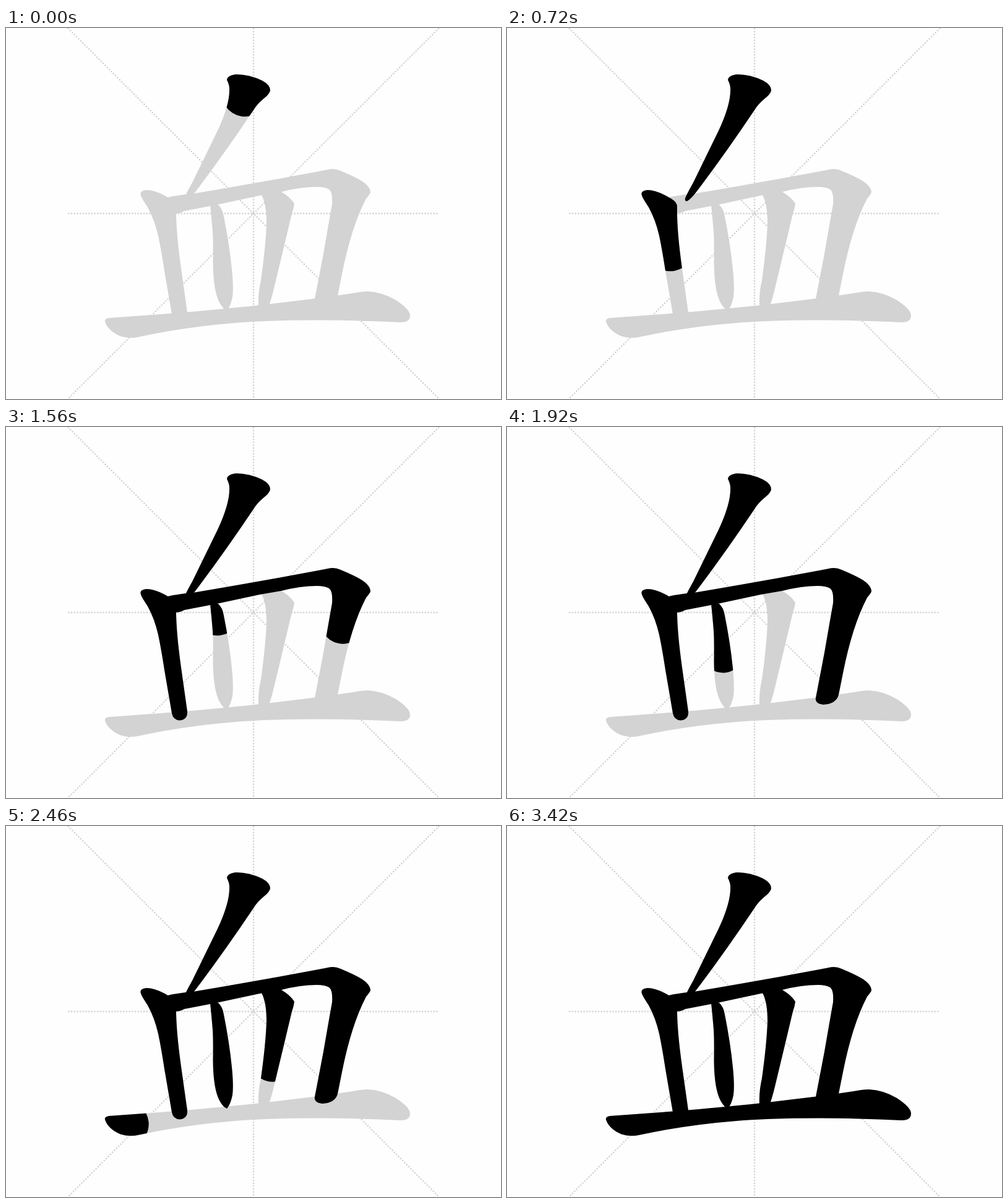
Recreate the animation shown at these times as an HTML page. Size 800x600 px, loop 3480 ms.

```html
<!DOCTYPE html>
<html lang="zh">
<head>
<meta charset="utf-8">
<title>Stroke order</title>
<style>
  html, body { margin: 0; width: 100%; height: 100%; overflow: hidden; background: #fefefe; }
  svg { display: block; width: 800px; height: 600px; }
  .guide { stroke: #d3d3d3; stroke-width: 1; stroke-dasharray: 1 1; fill: none; }
  .base { fill: #d3d3d3; }
  .brush { fill: none; stroke: #000; stroke-width: 75; stroke-linecap: round; stroke-linejoin: round; }
</style>
</head>
<body>
<svg id="stage" viewBox="0 0 800 600">
  <!-- guides on a 256 unit square -->
  <g class="guide" transform="translate(100 0) scale(2.34375)">
    <path d="M0 0L256 256"/>
    <path d="M256 0L0 256"/>
    <path d="M128 0V256"/>
    <path d="M0 128H256"/>
  </g>
</svg>
<script>
const LOOP = 3480, STEP = 60, DRAW = 980;

// start: when the brush touches down; path: brush centre line; shape: outline
const strokes = [
  {
    start: -140,
    path: 'M372 84L391 98L386 106Q366 155 292 278',
    shape: 'M357 84Q358 76 373 75Q393 75 414 85Q427 92 427 101Q426 107 415 115.5Q406 123 400.5 132' +
      'Q353 203 306.5 264.5Q296 278 291 280Q287 281 288 275Q292 266 301 250L342 166Q362 123 361 98Q361 92 357 84Z'
  },
  {
    start: 259,
    path: 'M228 270L252 300L264 356L281 462',
    shape: 'M218 271Q215 263 227 262Q241 262 260 273Q273 279 275 287Q274 325 283 389L293 460' +
      'Q294 473 281 474.5Q270 474 268 463L256 393Q251 360 246 336Q240 310 229 290Q219 275 218 271Z'
  },
  {
    start: 834,
    path: 'M264 287L470 251L530 240L556 262L518 435',
    shape: 'M258 275Q270 271 305 267.5Q415 249 520 229Q531 226 541 231Q565 241 576 248Q589 257 589 266' +
      'Q588 269 582 276Q558 322 543 398L536 433Q532 448 511 449Q497 447 499 438L513 365Q523 307 527 285' +
      'Q528 268 524 263Q520 257 502 257Q476 257 445 265L410 271L340 286L288 296Q282 300 272 300Z'
  },
  {
    start: 1489,
    path: 'M340 288L349 360L356 452',
    shape: 'M330 287Q336 283 343 286Q350 292 352 305Q361 350 365 390Q368 420 366 435Q363 450 357 457' +
      'Q351 455 345 444Q335 425 334.5 380Q335 345 334 330Q332 305 330 287Z'
  },
  {
    start: 1921,
    path: 'M440 285L441 300L431 376L416 450',
    shape: 'M413 270Q428 262 445 265Q460 274 466 284Q465 292 462 300Q449 355 435 413Q428 443 424 451' +
      'Q415 458 408 449Q407 430 412 408Q420 350 421 315Q421 285 413 270Z'
  },
  {
    start: 2435,
    path: 'M182 482H193L434 459L620 456',
    shape: 'M160 475Q159 470 166 469L268 461.5Q355 454.5 425 446.5L500 437.5Q530 433.5 560 429Q575 426 585 426' +
      'Q608 427 630 440Q653 455 653 465Q653 476 638 476Q560 472.5 500 472.5Q420 472.5 365 477.5Q290 483.5 215 499.5' +
      'Q200 503 185 498.5Q165 490 160 475Z'
  }
];

const stage = document.getElementById('stage');

function add(parent, tag, attrs) {
  const el = document.createElementNS('http://www.w3.org/2000/svg', tag);
  for (const key in attrs) el.setAttribute(key, attrs[key]);
  return parent.appendChild(el);
}

for (const s of strokes) add(stage, 'path', { class: 'base', d: s.shape });

strokes.forEach((s, i) => {
  const clip = add(stage, 'clipPath', { id: 'clip' + i });
  add(clip, 'path', { d: s.shape });
  const group = add(stage, 'g', { 'clip-path': `url(#clip${i})` });
  s.brush = add(group, 'path', { class: 'brush', d: s.path });
  s.length = s.brush.getTotalLength();
});

function render(ms) {
  const t = Math.floor((ms % LOOP) / STEP) * STEP;
  for (const s of strokes) {
    const p = Math.min(1, (t - s.start) / DRAW);
    s.brush.style.visibility = p > 0 ? 'visible' : 'hidden';
    s.brush.style.strokeDasharray =
      p >= 1 ? 'none' : `${Math.max(0, p) * s.length} ${2 * s.length}`;
  }
}

render(0);
let begin;
requestAnimationFrame(function tick(now) {
  begin ??= now;
  render(now - begin);
  requestAnimationFrame(tick);
});
</script>
</body>
</html>
```
